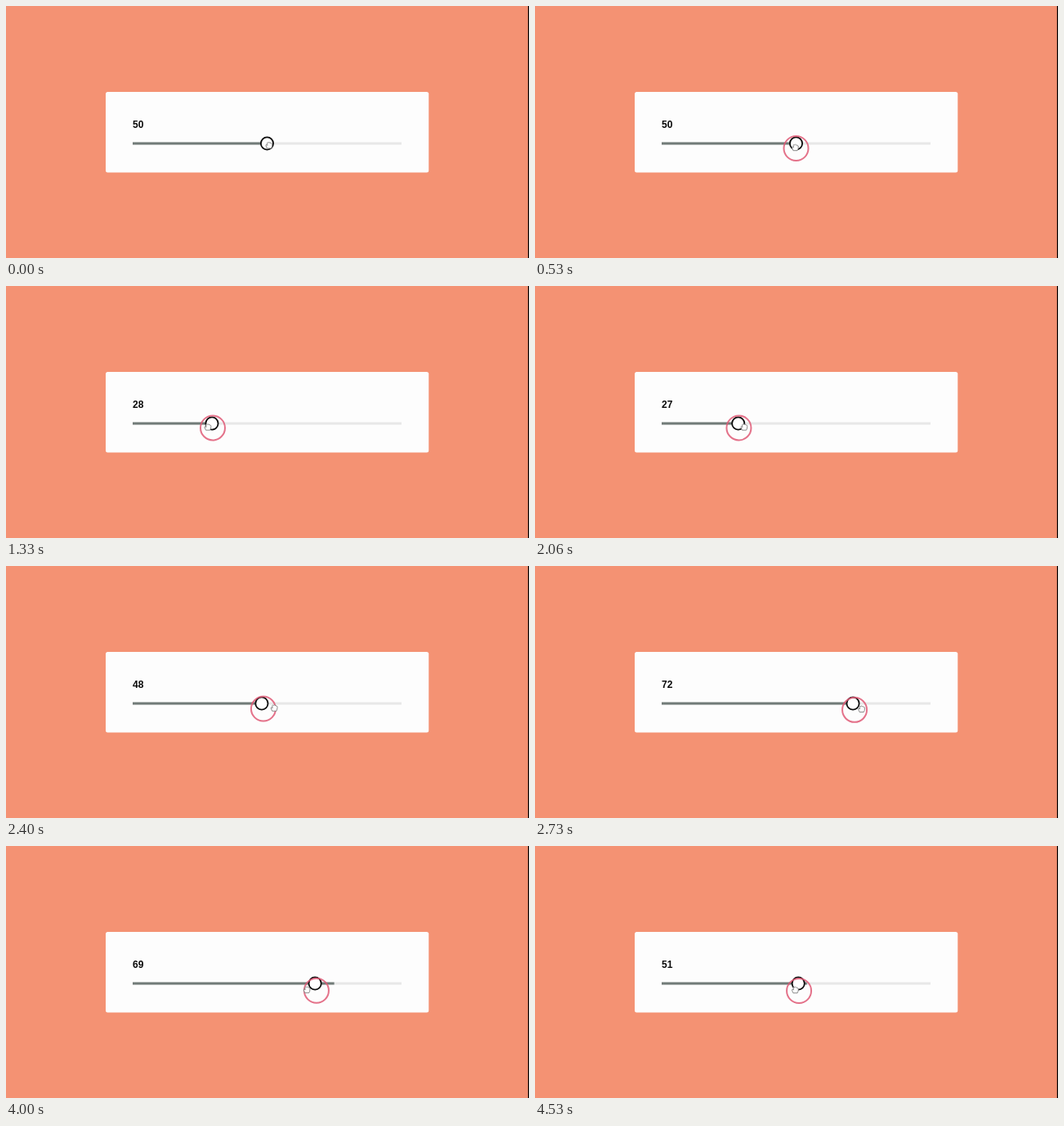
Write an HTML page that moves like this. It is 640 px wide and 308 px high and loops after 4600 ms.

```html
<!DOCTYPE html>
<html lang="en">
<head>
<meta charset="utf-8">
<title>Range slider</title>
<style>
  html, body { margin: 0; width: 100%; height: 100%; overflow: hidden; background: #f49273; }
  svg { display: block; width: 100%; height: 100%; }
  text { font: bold 12px "Liberation Sans", Arial, sans-serif; fill: #0b0b0b; }
</style>
</head>
<body>
<svg viewBox="0 0 640 308">
  <rect width="640" height="308" fill="#f49273"/>
  <rect x="638.8" width="1.2" height="308" fill="#000"/>
  <rect x="122" y="105" width="395.3" height="98.5" rx="2.5" fill="#fdfdfd"/>
  <text id="label" x="155" y="149">50</text>
  <rect x="155" y="166.5" width="329" height="3" fill="#e8e8e8"/>
  <rect id="fill" x="155" y="166.5" height="3" fill="#727c79"/>
  <circle id="knob" cy="168" r="7.6" fill="#fff" stroke="#0c0c0c" stroke-width="1.8"/>
  <circle id="ring" r="15" fill="none" stroke="#e05a76" stroke-width="2" opacity=".85"/>
  <path id="hand" d="M-2.6 4 L-4 .6 Q-4.2 -.8 -2.8 -.3 L-2.2 .4 L-2.4 -2.6 Q-1.8 -4 -.9 -2.8 Q0 -4.2 1 -2.7 Q2.2 -3.4 2.5 -2 Q3.8 -2.2 3.8 -.8 Q3.8 2 2.6 4 Z"
        fill="#fff" stroke="#6f6f6f" stroke-width=".8"/>
</svg>
<script>
const LOOP = 4600, FPS = 15, STEPS = 69, PRESS = 3;

const easeInOut = p => (1 - Math.cos(Math.PI * p)) / 2;
const easeOut = p => 1 - (1 - p) ** 1.4;
const lerp = (a, b, p) => a + (b - a) * p;

// Slider value and pointer height before the first drag, then where each drag leads.
const rest = { value: 50, y: 174 };
const drags = [
  { start: 8, end: 23, value: 26, y: 173.4, ease: easeInOut },
  { start: 30, end: 47, value: 85, y: 176.5, ease: p => easeInOut(p ** 0.84) },
  { start: 55, end: STEPS, value: 50, y: 177, ease: easeOut }
];
const lastDrag = drags[drags.length - 1];

function poseAt(step) {
  let pose = rest;
  for (const { start, end, value, y, ease } of drags) {
    if (step <= start) break;
    const p = ease(Math.min(1, (step - start) / (end - start)));
    pose = { value: lerp(pose.value, value, p), y: lerp(pose.y, y, p) };
  }
  return pose;
}

const [label, fill, knob, ring, hand] = ["label", "fill", "knob", "ring", "hand"]
  .map(id => document.getElementById(id));
const knobX = value => 164 + 3.11 * value;

function draw(step) {
  const { value, y } = poseAt(step);
  const speed = step ? Math.abs(value - poseAt(step - 1).value) : 0;
  const approach = Math.max(0, 1 - step / PRESS);
  const x = knobX(value);
  // The bar trails the knob on the final drag; the pointer runs one step ahead.
  const filled = step > lastDrag.start ? poseAt(step - 2).value : value;
  const handX = knobX(speed ? poseAt(step + 1).value : value) - 1 + 3.5 * approach;
  const handY = y - 1.3 - 2.7 * approach;

  label.textContent = Math.round(value);
  fill.setAttribute("width", 3.29 * filled);
  knob.setAttribute("cx", x);
  ring.setAttribute("cx", x + Math.min(2, 0.6 * speed));
  ring.setAttribute("cy", y);
  ring.setAttribute("visibility", step >= PRESS ? "visible" : "hidden");
  hand.setAttribute("transform", `translate(${handX} ${handY})`);
}

let start;
function tick(now) {
  start ??= now;
  const time = (now - start) % LOOP;
  draw(Math.min(STEPS - 1, Math.floor((time + 7) * FPS / 1000)));
  requestAnimationFrame(tick);
}
draw(0);
requestAnimationFrame(tick);
</script>
</body>
</html>
```
